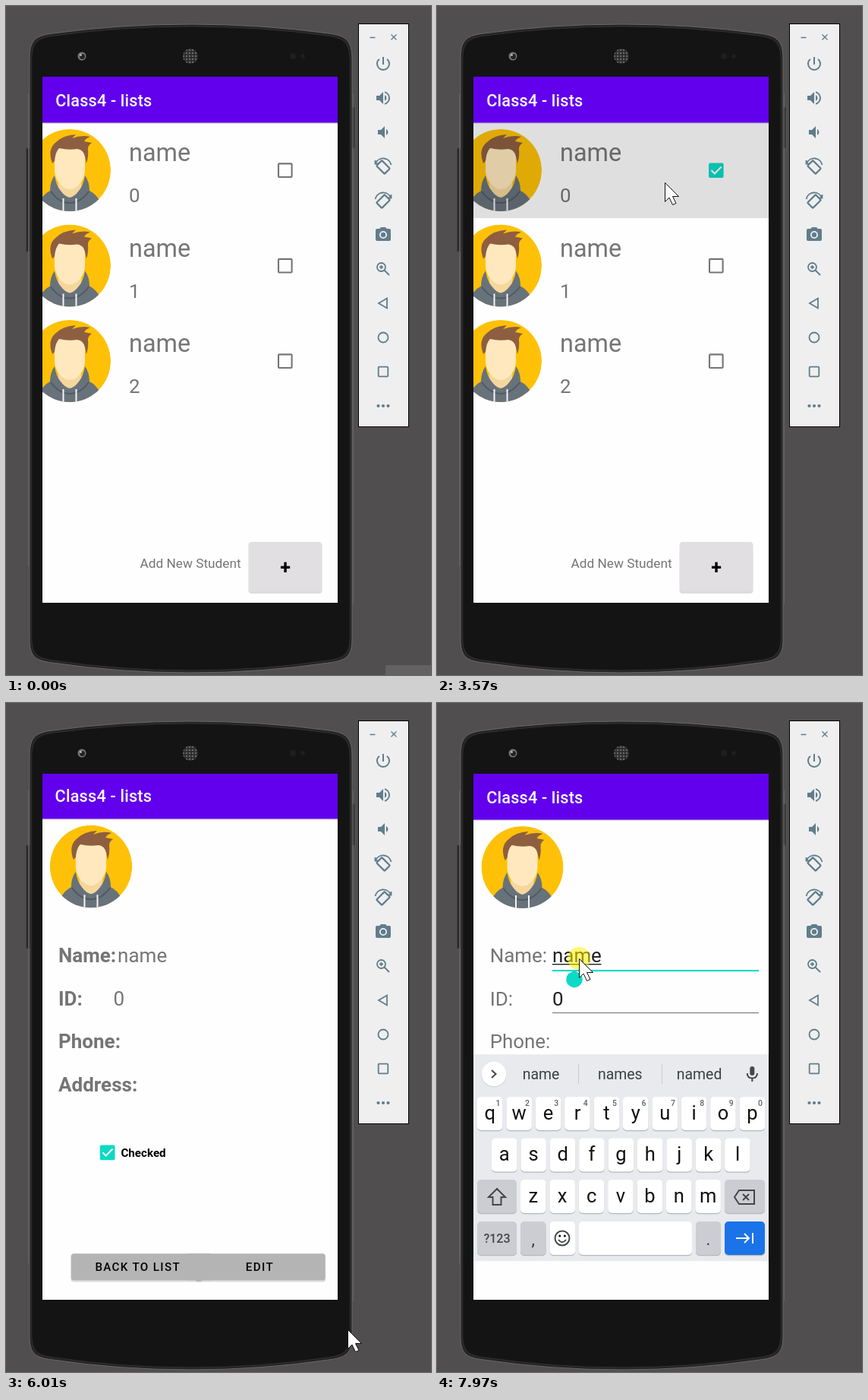
These frames come from a looping animation (560 by 880 pixels, 8000 ms). An HTML page:

```html
<!DOCTYPE html>
<html lang="en">
<head>
<meta charset="utf-8">
<title>Student list</title>
<style>
html, body { margin: 0; width: 100%; height: 100%; overflow: hidden; background: #514e4f }
svg { display: block }
text { font-family: Roboto, sans-serif; fill: #757575; white-space: pre }
.m { text-anchor: middle }
.med { font-weight: 500 }
.b { font-weight: 700 }
.title { font-weight: 500; letter-spacing: .2px }
.caps { font-weight: 500; font-size: 15.1px; letter-spacing: 1.35px; fill: #000; text-anchor: middle }
.line { fill: none; stroke: #607d8b; stroke-width: 1.8 }
.key { fill: none; stroke: #44474a; stroke-width: 2 }
</style>
</head>
<body>
<svg id="stage" width="560" height="880" viewBox="0 0 560 880"></svg>
<script>
const text = (x, y, size, s, cls = '', fill = '') =>
  `<text x="${x}" y="${y}" font-size="${size}" class="${cls}"${fill && ` style="fill:${fill}"`}>${s}</text>`;
const rect = (x, y, w, h, fill, r = 0, extra = '') =>
  `<rect x="${x}" y="${y}" width="${w}" height="${h}" fill="${fill}" rx="${r}" ${extra}/>`;
const at = (x, y, s) => `<g transform="translate(${x} ${y})">${s}</g>`;
const use = (id, x, y) => `<use href="#${id}" x="${x}" y="${y}"/>`;
const shadowed = (x, y, w, h, fill) =>
  rect(x - .5, y + 1, w + 1, h + 1.3, '#000', 4, 'opacity=".14"') + rect(x, y, w, h, fill, 3.5);
const icon = (y, d, extra = '') => at(485, y - 12, `<path d="${d}" fill="#607d8b"/>${extra}`);

const BODY = 'M31 70C31 45 38 39 62 36Q150 24 243 24T425 36C448 39 456 45 456 70V832C456 856 448 861 425 864Q336 877 243 877T62 864C38 861 31 856 31 832Z';

const defs = `<defs>
<clipPath id="screen"><rect x="48" y="93" width="389" height="692"/></clipPath>
<clipPath id="row"><rect x="48" y="154" width="389" height="125"/></clipPath>
<clipPath id="editBtn"><rect x="250" y="723" width="170" height="35" rx="3.5"/></clipPath>
<clipPath id="disc"><circle r="54"/></clipPath>
<pattern id="mesh" width="4" height="4" patternUnits="userSpaceOnUse"><circle cx="2" cy="2" r="1.3" fill="#666"/></pattern>
<g id="avatar" clip-path="url(#disc)">
  <circle r="54" fill="#ffc107"/>
  <path d="M-15 8H15V26Q10 35 0 38Q-10 35-15 26Z" fill="#f5d79c"/>
  <path d="M-46 56Q-39 33-26 27Q-26 15-20 7Q-18 20-12 27Q-6 35 0 36Q6 35 12 27Q18 20 20 7Q26 15 26 27Q39 33 46 56Z" fill="#68727b"/>
  <path d="M-25 28Q-14 43 0 43T25 28" fill="none" stroke="#505a63" stroke-width="2"/>
  <path d="M-20-33H20V0C20 14 9 25 0 25S-20 14-20 0Z" fill="#ffe8be"/>
  <path d="M-23-9Q-30-28-18-37Q-9-46 8-47L3-42Q16-47 27-44Q21-42 19-38L29-36Q24-33 24-28Q25-18 22-9L20-18Q18-27 10-28Q-2-26-14-29Q-19-24-20-12Z" fill="#8d5f40"/>
  <path d="M-8.5 37V56M8.5 37V56" stroke="#f4f4f4" stroke-width="2"/>
</g>
<rect id="off" x="-9" y="-8.6" width="17.6" height="17.6" rx="1" fill="none" stroke="#757575" stroke-width="2.1"/>
<g id="on"><rect x="-10" y="-9.6" width="19.6" height="19.6" rx="2" fill="#0bdac6"/>
  <path d="M-6.5 0L-2.2 4.4L6.6-4.6" fill="none" stroke="#fff" stroke-width="2.1"/></g>
</defs>`;

const page = (id, body) => `<g id="${id}">${rect(48, 93, 389, 692, '#fefefe')}
  ${rect(48, 153, 389, 2, '#000', 0, 'opacity=".1"')}${rect(48, 93, 389, 60.6, '#6200ee')}
  ${text(65.3, 131.6, 21.6, 'Class4 - lists', 'title', '#fff')}${body}
  <rect class="dim" x="48" y="93" width="389" height="692" opacity="0"/></g>`;

const device = `${rect(0, 0, 560, 880, '#514e4f')}
  ${rect(500, 867, 60, 13, '#636162', 0, 'id="corner"')}
  ${rect(26.5, 187, 5, 136, '#262626', 1, 'stroke="#444"')}${rect(455, 133, 4.5, 54, '#262626', 1, 'stroke="#444"')}
  <path d="M29.5 115V737M457.5 115V787" stroke="#636162"/>
  <path d="${BODY}" fill="#242424" stroke="#696768"/>
  <path d="${BODY}" fill="#141414" stroke="#333" transform="translate(243.5 450.5) scale(.987 .993) translate(-243.5 -450.5)"/>
  <circle cx="100" cy="66" r="5.5" fill="#777"/><circle cx="100.5" cy="66.5" r="3.4" fill="#222"/><circle cx="98.5" cy="64.5" r="1.4" fill="#bbb"/>
  <circle cx="243" cy="66" r="10" fill="#2b2b2b"/><circle cx="243" cy="66" r="10" fill="url(#mesh)"/>
  <circle cx="378" cy="66" r="4" fill="#1e1e1e"/><circle cx="391" cy="66" r="3" fill="#1e1e1e"/>`;

const turn = `<g class="line"><rect x="-5" y="-7.5" width="10" height="15" rx="1" stroke-width="2.2" transform="translate(0 1) rotate(-45)"/>
  <path d="M-10-4A10.8 10.8 0 0 1 10.5-2M-10.5-8V-3.5H-6"/></g>`;
const sidebar = `${rect(464.5, 23.5, 66, 530, '#efefef', 0, 'stroke="#000"')}
  <path d="M479.5 41.5H486.5M507.5 37.5L514.5 44.5M514.5 37.5L507.5 44.5" stroke="#607d8b" stroke-width="1.3"/>
  ${icon(76, 'M13 3h-2v10h2V3zm4.83 2.17l-1.42 1.42A6.92 6.92 0 0 1 19 12c0 3.87-3.13 7-7 7A7 7 0 0 1 7.58 6.58L6.17 5.17A8.93 8.93 0 0 0 3 12a9 9 0 0 0 18 0c0-2.74-1.23-5.18-3.17-6.83z')}
  ${icon(121, 'M3 9v6h4l5 5V4L7 9H3zm13.5 3A4.5 4.5 0 0 0 14 7.97v8.05A4.5 4.5 0 0 0 16.5 12zM14 3.23v2.06a7 7 0 0 1 0 13.42v2.06a9 9 0 0 0 0-17.54z')}
  ${icon(166, 'M18.5 12A4.5 4.5 0 0 0 16 7.97v8.05A4.5 4.5 0 0 0 18.5 12zM5 9v6h4l5 5V4L9 9H5z')}
  <g transform="translate(497 211) scale(-1 1)"><g transform="scale(-1 1)">${turn}</g></g>
  <g transform="translate(497 256) scale(-1 1)">${turn}</g>
  ${icon(301, 'M9 2L7.2 4H4a2 2 0 0 0-2 2v12a2 2 0 0 0 2 2h16a2 2 0 0 0 2-2V6a2 2 0 0 0-2-2h-3.2L15 2H9zm3 15a5 5 0 1 1 0-10a5 5 0 0 1 0 10z', '<circle cx="12" cy="12" r="3.2" fill="#607d8b"/>')}
  ${icon(346, '', '<path class="line" d="M4 9.5a5.5 5.5 0 1 0 11 0a5.5 5.5 0 1 0-11 0M13.5 13.5L20 20M9.5 7V12M7 9.5H12"/>')}
  <path class="line" d="M502 384.5V397.5L491 391Z"/><circle class="line" cx="497" cy="436" r="6.5"/>
  <rect class="line" x="490.7" y="474.7" width="12.6" height="12.6" rx="1"/>
  ${[490.5, 497, 503.5].map(x => `<circle cx="${x}" cy="526" r="2.1" fill="#607d8b"/>`).join('')}`;

const list = page('list', [0, 1, 2].map(i => at(0, i * 125.5,
    use('avatar', 84, 216) + text(162, 204, 32.4, 'name') + text(162, 258, 25.9, i) + use('off', 368, 216))).join('') +
  `<g id="ticked">${rect(357, 205, 22, 22, '#fefefe')}${use('on', 368, 216)}</g>
  <circle id="tickRipple" cx="368" cy="216" r="21" opacity="0" fill="#03dac5"/>
  <g clip-path="url(#row)"><circle id="rowRipple" cx="300" cy="232" r="0" opacity=".12"/></g>` +
  text(176.5, 738.5, 17.25, 'Add New Student') + shadowed(320, 705, 96, 65.5, '#e1dfe1') +
  text(368, 746.5, 25, '+', 'm b', '#000'));

const labels = ['Name:', 'ID:', 'Phone:', 'Address:'];
const label = cls => labels.map((s, i) => text(69.7, 341 + i * 56.7, 25.9, s, cls)).join('');

const details = page('details', use('avatar', 112.5, 216) + label('b') +
  text(147.5, 341, 25.9, 'name') + text(142, 397.7, 25.9, '0') +
  use('on', 134.3, 590.5) + text(151.8, 596, 15.1, 'Checked', 'b', '#000') +
  shadowed(86.5, 723, 172, 35, '#b4b4b4') + shadowed(250, 723, 170, 35, '#b4b4b4') + rect(240, 723, 30, 35, '#b4b4b4') +
  '<g clip-path="url(#editBtn)"><circle id="btnRipple" cx="338" cy="735" r="0" fill="#fff" opacity="0"/></g>' +
  text(174, 746, 15.1, 'BACK TO LIST', 'caps') + text(334, 746, 15.1, 'EDIT', 'caps'));

const edit = page('edit', use('avatar', 112.5, 216) + label('') +
  text(152, 341, 25.9, 'name', '', '#212121') + text(152, 397.7, 25.9, '0', '', '#212121') +
  [351.5, 407.5, 464.3, 521].map(y => rect(152, y - .5, 272, 1.1, '#757575')).join('') +
  `<g id="focus">${rect(152, 343, 64.5, 1.4, '#212121')}${rect(152, 351, 272, 2.1, '#0bdac6')}
  ${rect(180, 314, 2, 38, '#0bdac6', 0, 'id="caret"')}
  <path d="M181 352L188.6 356A10.7 10.7 0 1 1 173.4 356Z" fill="#0bdac6"/></g>` +
  use('on', 134.5, 602) + text(152, 608, 15.1, 'Checked', '', '#000') +
  ['CANCEL', 'DELETE', 'SAVE'].map((s, i) =>
    shadowed(69.5 + i * 122.5, 688, 101, 39, '#b4b4b4') + text(121 + i * 122.3, 713, 15.1, s, 'caps')).join(''));

const cap = (x, y, w, fill = '#fff') => rect(x, y + 1.2, w, 44, '#b4b7bb', 5) + rect(x, y, w, 44, fill, 5);
const letters = (s, x0, y) => [...s].map((c, i) => {
  const x = x0 + i * 38.4;
  return cap(x - 16.8, y, 33.5) + text(x, y + 29.5, 25.5, c, 'm', '#111');
}).join('');
const grey = '#cccdd2';
const keyboard = `<g id="keyboard">${rect(48, 462, 389, 2, '#000', 0, 'opacity=".06"')}${rect(48, 463, 389, 271, '#e8eaed')}
  ${rect(48, 734, 389, 51, '#fefefe')}
  <circle cx="75" cy="488.8" r="16.5" opacity=".12"/><circle cx="75" cy="488" r="16.2" fill="#fff"/>
  <path class="key" d="M72 483L77.5 488L72 493"/>
  ${['name', 'names', 'named'].map((s, i) => text(137 + i * 104.3, 495, 19.4, s, 'm', '#3c4043')).join('')}
  <path d="M186.5 475V501M296.5 475V501" stroke="#c8cbce"/>
  ${rect(412.3, 478, 6, 12, '#44474a', 3)}<path class="key" d="M408.7 487Q409 493.5 415.3 493.5T422 487M415.3 493V498"/>
  ${letters('qwertyuiop', 69.8, 518)}
  ${[...'1234567890'].map((c, i) => text(80.5 + i * 38.4, 529.5, 10.5, c, 'm med', '#5f6368')).join('')}
  ${letters('asdfghjkl', 88.8, 572.5)}${letters('zxcvbnm', 126.8, 627)}
  ${cap(53, 627, 52, grey)}${cap(379, 627, 53, grey)}${cap(53, 682, 52, grey)}${cap(110, 682, 33.5, grey)}
  ${cap(148.5, 682, 33.5)}${cap(187, 682, 149)}${cap(341, 682, 33, grey)}${cap(379, 682, 53, '#1a73e8')}
  <path class="key" d="M79 639L90 650H84.5V660H73.5V650H68ZM392 650L398 641H418V659H398ZM403 646L411 654M411 646L403 654"/>
  ${text(79, 710, 16, '?123', 'm med', '#44474a')}${text(126.7, 713, 22, ',', 'm', '#333')}${text(357.5, 713, 22, '.', 'm', '#333')}
  <circle class="key" cx="165" cy="704" r="9.5"/><path class="key" d="M160 706Q165 712.5 170 706"/>
  <circle cx="161.7" cy="701" r="1.5"/><circle cx="168.3" cy="701" r="1.5"/>
  <path d="M394 704H411M405 698L411 704L405 710M416 697V711" fill="none" stroke="#fff" stroke-width="2"/></g>`;

const pointer = `<g id="pointer"><circle id="click" r="15" fill="#fff000" opacity=".55"/>
  <path d="M.5 .5V25.5L6 20L10.5 29.5L15 27.5L10.5 18.5H18.5Z" fill="#fff" stroke="#111"/></g>`;

const stage = document.getElementById('stage');
stage.innerHTML = defs + device + `<g clip-path="url(#screen)">${list}${details}${edit}${keyboard}</g>` + sidebar + pointer;

const $ = id => document.getElementById(id);
const set = (id, attrs) => { for (const k in attrs) $(id).setAttribute(k, attrs[k]); };
const show = (id, on) => $(id).setAttribute('visibility', on ? 'inherit' : 'hidden');
const part = (t, from, len) => Math.min(1, Math.max(0, (t - from) / len));
const smooth = x => x * x * (3 - 2 * x);

// Pointer stops: time, x, y
const path = [
  [450, 523, 627], [1220, 321, 212], [1500, 190, 420], [1850, 332, 176], [1960, 345, 163], [2070, 371, 212],
  [2300, 434, 338], [2580, 367, 215], [2700, 367, 215], [2880, 315, 226], [3200, 300, 232], [3840, 300, 232],
  [4200, 496, 640], [4590, 340, 420], [4900, 170, 330], [5200, 300, 803], [5430, 338, 735], [5800, 338, 735],
  [6000, 450, 824], [6070, 450, 824], [6250, 440, 790], [6630, 320, 600], [7020, 187, 336], [8000, 187, 336]
];
const clicks = [[2580, 2700], [3260, 3400], [5520, 5660], [7050, 7190], [7970, 8000]];
const OPEN_DETAILS = 3872, OPEN_EDIT = 5981;

function pointerAt(t) {
  const i = Math.max(1, path.findIndex(k => k[0] > t));
  const [a, b] = [path[i - 1], path[i]];
  const e = smooth(part(t, a[0], b[0] - a[0]));
  return [a[1] + (b[1] - a[1]) * e, a[2] + (b[2] - a[2]) * e];
}

const scaled = s => `translate(242.5 439) scale(${s}) translate(-242.5 -439)`;
const openEase = x => x < .166 ? .4 * (x / .166) ** 2 : x >= 1 ? 1 : 1 - .6 * Math.exp(-12 * (x - .166));

function drawPage(id, t, opens, leaves) {
  show(id, t >= opens && t < leaves + 400);
  const p = openEase(part(t, opens, 400)), q = openEase(part(t, leaves, 400));
  set(id, { transform: scaled((.85 + .15 * p) * (1 + .05 * q)), opacity: part(t, opens + 45, 55) });
  $(id).querySelector('.dim').setAttribute('opacity', .16 * q * q);
}

function draw(t) {
  show('corner', t < 70);
  drawPage('list', t, -1000, OPEN_DETAILS);
  drawPage('details', t, OPEN_DETAILS, OPEN_EDIT);
  drawPage('edit', t, OPEN_EDIT, 1e6);

  show('ticked', t >= 2650);
  set('tickRipple', { opacity: t > 2580 ? .2 * (1 - part(t, 2660, 180)) : 0 });
  set('rowRipple', { r: 330 * smooth(part(t, 3260, 340)) });
  set('btnRipple', { r: 110 * part(t, 5520, 200), opacity: t > 5520 ? .24 * (1 - part(t, 5600, 140)) : 0 });

  show('focus', t >= 7120);
  show('caret', t >= 7120 && t < 7630);
  const k = smooth(part(t, 7350, 320));
  set('keyboard', { transform: `translate(0 ${280 * (1 - k)})`, opacity: Math.min(1, k * 1.3) });

  const [x, y] = pointerAt(t);
  show('pointer', t >= 450 && (t < 3840 || t >= 4200));
  set('pointer', { transform: `translate(${x} ${y})` });
  show('click', clicks.some(([a, b]) => t >= a && t < b));
}

function tick() {
  draw(performance.now() % 8000);
  requestAnimationFrame(tick);
}
tick();
</script>
</body>
</html>
```
